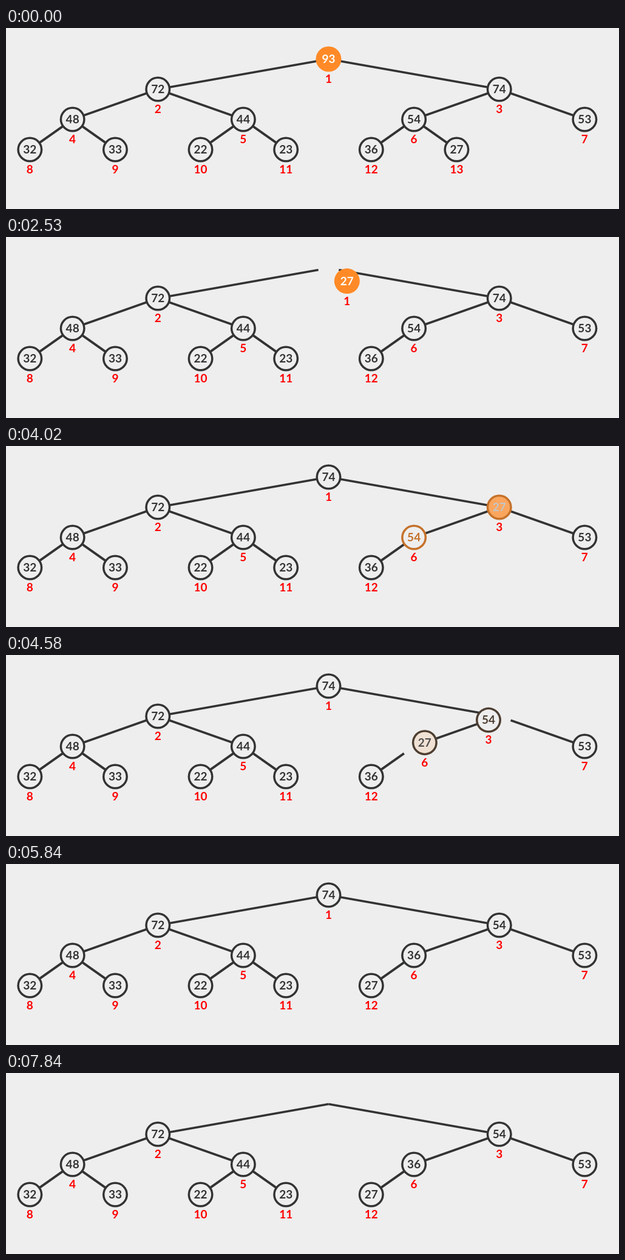
Write an HTML page with a canvas that moves like this. It is 1010 px wide and 300 px high and loops after 7990 ms.

```html
<!DOCTYPE html>
<html lang="en">
<head>
<meta charset="utf-8">
<title>Heap: extract the maximum</title>
<style>
  html, body { margin: 0; width: 100%; height: 100%; overflow: hidden; background: #eee; }
  canvas { display: block; }
</style>
</head>
<body>
<canvas id="stage" width="1010" height="300"></canvas>
<script>
const ctx = document.getElementById('stage').getContext('2d');
const LOOP = 7990, MOVE = 500;
const DARK = [51, 51, 51], PAPER = [238, 238, 238], ORANGE = [255, 138, 39], WHITE = [255, 255, 255];

// Start times of the steps
const TAKE = 1174, PICK = 1685, LIFT = 2196, COMPARE1 = 2706, SWAP1 = 3217, COMPARE2 = 3728,
      SWAP2 = 4239, COMPARE3 = 4750, SWAP3 = 5261, NEXT = 6790, TAKE2 = 7360;

const ease = x => {
  x = Math.min(1, Math.max(0, x));
  return x < .5 ? 4 * x ** 3 : 1 - 4 * (1 - x) ** 3;
};
const mix = (a, b, k) => a.map((v, i) => v + (b[i] - v) * k);
const rgb = c => `rgb(${c.map(Math.round)})`;

// A track is [[time, value], ...]; each entry starts an eased move to its value.
const follow = (track, t, map = v => [v]) =>
  track.reduce((v, [start, goal]) => v ? mix(v, map(goal), ease((t - start) / MOVE)) : map(goal), null);

// Centre of a heap slot, counted from 1
function place(slot) {
  const level = Math.floor(Math.log2(slot)), row = 2 ** level;
  return [531.5 + 1125 * ((slot - row + .5) / row - .5), 51.5 + 50 * level];
}

const still = value => [[0, value]];
const node = (value, slot, more) =>
  ({ value, path: still(slot), glow: still(0), fill: still(0), size: still(1), ...more });

const lastGlow = [[0, 0], [PICK, 1], [SWAP1, 0], [COMPARE2, 1], [SWAP2, 0], [COMPARE3, 1], [SWAP3, 0]];
const nodes = [
  node(72, 2), node(48, 4), node(44, 5), node(53, 7),
  node(32, 8), node(33, 9), node(22, 10), node(23, 11),
  node(93, 1, { glow: still(1), fill: still(1), size: [[0, 1], [TAKE, 0]] }),
  node(74, 3, {
    path: [[0, 3], [SWAP1, 1]],
    glow: [[0, 0], [COMPARE1, 1], [SWAP1, 0], [NEXT, 1]],
    fill: [[0, 0], [NEXT, 1]],
    size: [[0, 1], [TAKE2, 0]]
  }),
  node(54, 6, { path: [[0, 6], [SWAP2, 3]], glow: [[0, 0], [COMPARE2, 1], [SWAP2, 0]] }),
  node(36, 12, { path: [[0, 12], [SWAP3, 6]], glow: [[0, 0], [COMPARE3, 1], [SWAP3, 0]] }),
  node(27, 13, {
    path: [[0, 13], [LIFT, 1], [SWAP1, 3], [SWAP2, 6], [SWAP3, 12]],
    glow: lastGlow, fill: lastGlow
  })
];
const rootGap = [[0, 20], [TAKE, 0], [LIFT, 20], [TAKE2, 0]];

function edge(child, t) {
  const from = place(child >> 1), to = place(child);
  const length = Math.hypot(to[0] - from[0], to[1] - from[1]);
  const gap = child < 4 ? follow(rootGap, t)[0] : 20;
  const start = mix(from, to, gap / length);
  let end = mix(to, from, 20 / length);
  if (child === 13) {
    const gone = ease((t - LIFT) / MOVE);
    if (gone === 1) return;
    end = mix(end, from, gone);
  }
  ctx.beginPath();
  ctx.moveTo(...start);
  ctx.lineTo(...end);
  ctx.stroke();
}

function disc(x, y, r, color) {
  ctx.fillStyle = rgb(color);
  ctx.beginPath();
  ctx.arc(x, y, r, 0, 2 * Math.PI);
  ctx.fill();
}

function write(text, x, y, size, color) {
  ctx.font = `bold ${19 * size}px Lato, "Open Sans", sans-serif`;
  ctx.fillStyle = color;
  ctx.fillText(text, x, y);
}

function drawNode({ value, path, glow, fill, size }, t) {
  const [s] = follow(size, t);
  if (s < .005) return;
  const [x, y] = follow(path, t, place);
  const [g] = follow(glow, t), [f] = follow(fill, t);
  const slot = path.filter(([start]) => t >= start).pop()[1];
  disc(x, y, 21 * s, mix(DARK, ORANGE, g));
  disc(x, y, 17.5 * s, mix(PAPER, ORANGE, f));
  write(value, x, y + 6.5, s, rgb(f ? mix(DARK, WHITE, f) : mix(DARK, ORANGE, g)));
  write(slot, x, y + 39.5, s, '#f00');
}

function draw(t) {
  ctx.fillStyle = rgb(PAPER);
  ctx.fillRect(0, 0, 1010, 300);
  ctx.textAlign = 'center';
  ctx.strokeStyle = rgb(DARK);
  ctx.lineWidth = 3.8;
  for (let child = 2; child <= 13; child++) edge(child, t);
  nodes.forEach(n => drawNode(n, t));
}

const begin = performance.now();
function tick() {
  draw((performance.now() - begin) % LOOP);
  requestAnimationFrame(tick);
}
tick();
</script>
</body>
</html>
```
